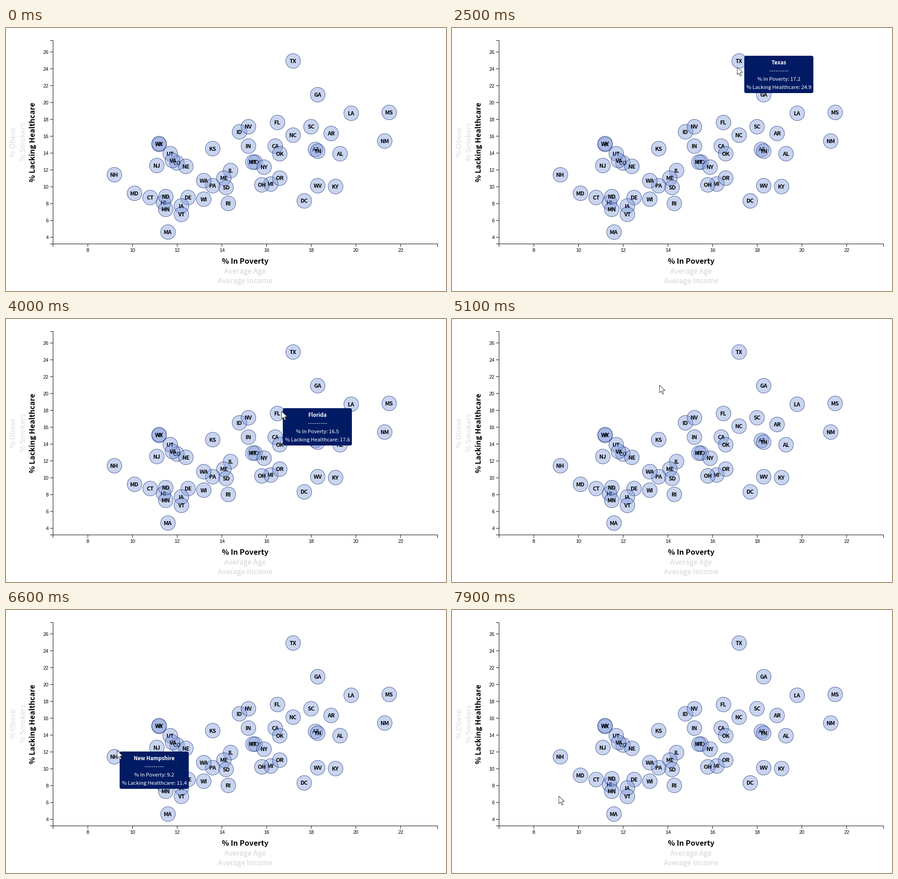
These frames come from a looping animation (968x578 px, 8000 ms). A matplotlib script:

```python
import math

import matplotlib.pyplot as plt
import numpy as np
from matplotlib.animation import FuncAnimation
from matplotlib.patches import Circle, FancyBboxPatch, Polygon

W, H, DPI = 968, 578, 64
PX = 72 / DPI  # points per pixel
FRAMES, STEP = 80, 100

UI = "Noto Sans CJK JP"
NAVY = "#001b64"
FILL = (120 / 255, 148 / 255, 215 / 255, 0.4)
EDGE = (0, 0.1, 0.4, 0.65)
LEFT, BOTTOM, TICK = 103.5, 474.5, 6.5
TIP_W, TIP_H = 152, 82

# the plotted data: % in poverty, % lacking healthcare
STATES = dict(
    AL=(19.3, 13.9), AK=(11.2, 15), AZ=(18.2, 14.4), AR=(18.9, 16.3), CA=(16.4, 14.8),
    CO=(12, 12.8), CT=(10.8, 8.7), DE=(12.5, 8.7), DC=(17.7, 8.3), FL=(16.5, 17.6),
    GA=(18.3, 20.9), HI=(11.4, 8.1), ID=(14.8, 16.5), IL=(14.4, 11.9), IN=(15.2, 14.8),
    IA=(12.2, 7.7), KS=(13.6, 14.5), KY=(19.1, 10), LA=(19.8, 18.7), ME=(14.1, 11),
    MD=(10.1, 9.2), MA=(11.6, 4.6), MI=(16.2, 10.3), MN=(11.5, 7.3), MS=(21.5, 18.8),
    MO=(15.5, 12.9), MT=(15.4, 12.9), NE=(12.4, 12.4), NV=(15.2, 17.1), NH=(9.2, 11.4),
    NJ=(11.1, 12.5), NM=(21.3, 15.4), NY=(15.9, 12.3), NC=(17.2, 16.1), ND=(11.5, 8.8),
    OH=(15.8, 10.2), OK=(16.6, 13.9), OR=(16.6, 11), PA=(13.6, 10.1), RI=(14.3, 8),
    SC=(18, 17.1), SD=(14.2, 9.9), TN=(18.3, 14.2), TX=(17.2, 24.9), UT=(11.7, 13.9),
    VT=(12.2, 6.7), VA=(11.8, 13.1), WA=(13.2, 10.7), WV=(18.3, 10.1), WI=(13.2, 8.5),
    WY=(11.2, 15.1),
)
NAMES = {"TX": "Texas", "FL": "Florida", "NH": "New Hampshire"}

# pointer moves: start ms, end ms, goal x, goal y
ENTRY = (46, 0)
MOVES = [
    (200, 1000, 589, 91), (1000, 1100, 604, 91), (1200, 1500, 627, 88),
    (1500, 1900, 631, 82), (2400, 2500, 627, 85), (2600, 3300, 614, 195),
    (3400, 3600, 609.5, 195), (3700, 4000, 606, 202), (4500, 4800, 500, 128),
    (4800, 5100, 456, 144.5), (5200, 6100, 251, 285), (6200, 6500, 244, 308),
    (7100, 7500, 171, 337), (7600, 7900, 234.5, 408),
]
ARROW = np.array([(0.5, 1), (0.5, 17.5), (4.3, 14), (7.2, 20.5),
                  (9.8, 19.4), (7, 13), (12.6, 12.7)])


def place(state):
    pov, care = STATES[state]
    return sx(pov), sy(care)


def sx(v):
    return 179.5 + (v - 8) * 49.15


def sy(v):
    return 459.6 - (v - 4) * 18.52


def pointer_at(t):
    x, y = ENTRY
    for start, end, gx, gy in MOVES:
        u = min(max((t - start) / (end - start), 0), 1)
        u *= 2 - u  # ease out
        x, y = x + (gx - x) * u, y + (gy - y) * u
    return x, y


fig = plt.figure(figsize=(W / DPI, H / DPI), dpi=DPI, facecolor="white")
ax = fig.add_axes([0, 0, 1, 1])
ax.set_xlim(0, W)
ax.set_ylim(H, 0)
ax.axis("off")


def label(x, y, s, size, font=UI, ha="center", **kw):
    return ax.text(x, y, s, fontsize=size * PX, family=font, ha=ha, va="baseline",
                   rotation_mode="anchor", **{"zorder": 2, **kw})


def line(xs, ys):
    ax.plot(xs, ys, color="black", lw=PX, zorder=1, snap=False,
            solid_capstyle="butt", solid_joinstyle="miter")


# axes
line([LEFT - TICK, LEFT, LEFT, LEFT - TICK], [27.5, 27.5, BOTTOM, BOTTOM])
line([LEFT, LEFT, 949.5, 949.5], [BOTTOM + TICK, BOTTOM, BOTTOM, BOTTOM + TICK])
for v in range(8, 23, 2):
    x = sx(v) + 0.5
    line([x, x], [BOTTOM, BOTTOM + TICK])
    label(x, 492, str(v), 11, "Liberation Sans")
for v in range(4, 27, 2):
    y = sy(v) + 0.5
    line([LEFT - TICK, LEFT], [y, y])
    label(LEFT - 10, y + 4, str(v), 11, "Liberation Sans", ha="right")

# axis titles
label(526, 518, "% In Poverty", 16.3, weight="bold")
label(526, 540, "Average Age", 16, color="#d4d4d4")
label(526, 561, "Average Income", 16, color="#d4d4d4")
label(64, 250.5, "% Lacking Healthcare", 16.3, weight="bold", rotation=90)
label(43, 250.5, "% Smokers", 16, color="#dddddd", rotation=90)
label(21, 250.5, "% Obese", 16, color="#dddddd", rotation=90)

for state in STATES:
    cx, cy = place(state)
    ax.add_patch(Circle((cx, cy), 16.2, fc=FILL, ec=EDGE, lw=PX, zorder=2))
    label(cx, cy + 4.5, state, 12.2, weight="bold")

# tooltip
box = FancyBboxPatch((0, 0), TIP_W, TIP_H, boxstyle="round,pad=0,rounding_size=4",
                     fc=NAVY, ec="none", zorder=5)
ax.add_patch(box)
title = label(0, 0, "", 11.5, color="white", weight="bold", zorder=6)
poverty = label(0, 0, "", 11.35, color="white", zorder=6)
health = label(0, 0, "", 11.35, color="white", zorder=6)
dashes, = ax.plot([], [], color="white", lw=PX, ls=(0, (3.2, 1.6)), alpha=0.9,
                  dash_capstyle="butt", zorder=6)
tip = [box, dashes, title, poverty, health]

pointer = Polygon(ARROW, closed=True, fc="white", ec="#222222", lw=0.9 * PX,
                  joinstyle="miter", zorder=7)
ax.add_patch(pointer)


def show_tip(state):
    pov, care = STATES[state]
    cx, cy = place(state)
    x, y = round(cx + 11.5), round(cy - 11.5)
    mid = x + TIP_W / 2
    box.set_bounds(x, y, TIP_W, TIP_H)
    dashes.set_data([mid - 21, mid + 21.5], [y + 33, y + 33])
    title.set(text=NAMES[state], position=(mid, y + 19))
    poverty.set(text=f"% In Poverty: {pov}", position=(mid, y + 55))
    health.set(text=f"% Lacking Healthcare: {care}", position=(mid, y + 73))


def draw(i):
    t = i * STEP
    x, y = pointer_at(t)
    pointer.set_visible(t >= MOVES[0][0])
    pointer.set_xy(ARROW + (x, y))
    hovered = [s for s in NAMES if math.dist((x, y), place(s)) < 16]
    for part in tip:
        part.set_visible(bool(hovered))
    if hovered:
        show_tip(hovered[0])
    return [*tip, pointer]


anim = FuncAnimation(fig, draw, frames=FRAMES, interval=STEP, repeat=True,
                     repeat_delay=0)
plt.show()
```
